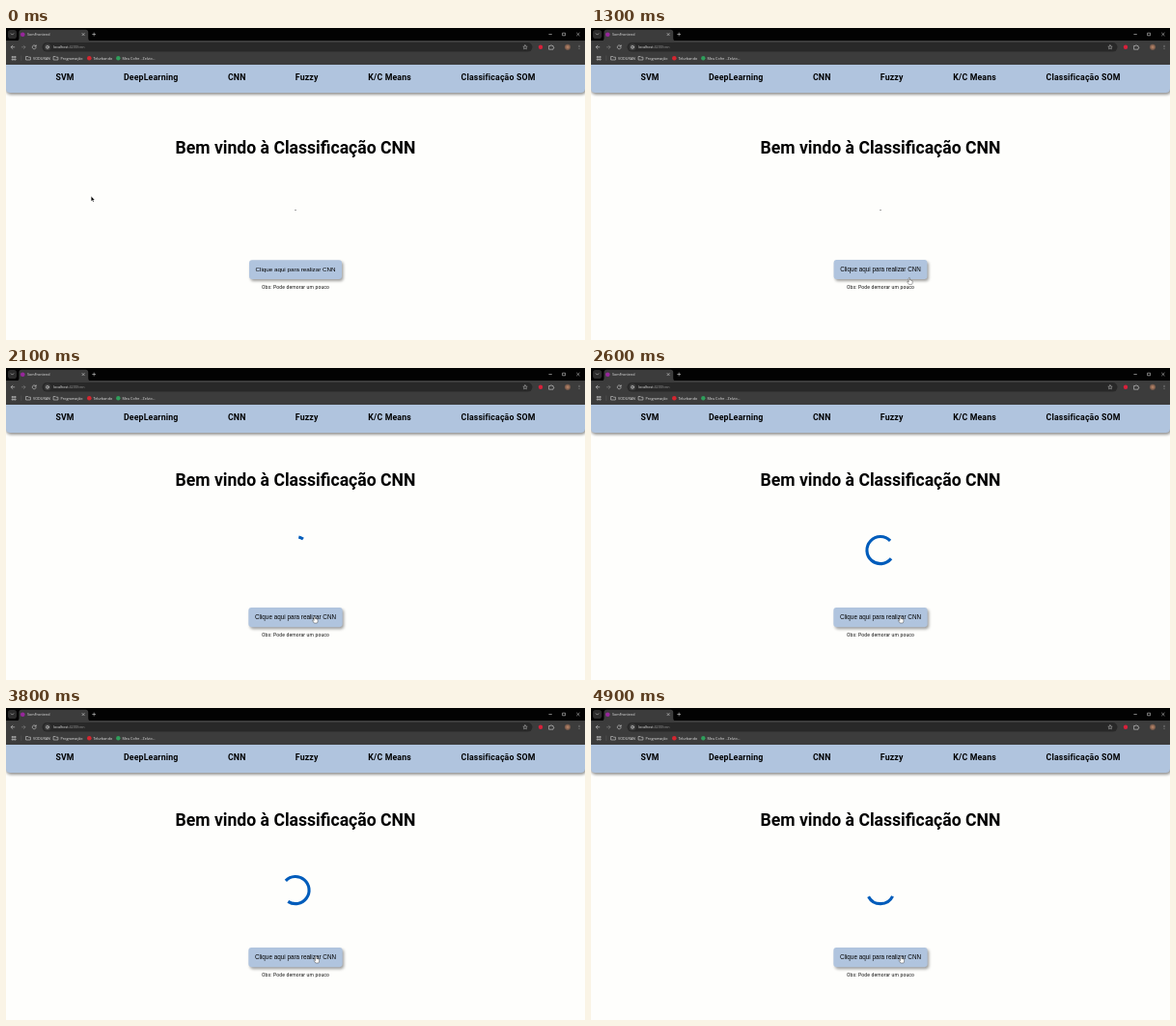
Animation of 600x323 px, one loop 5000 ms. Source, as an HTML page:

```html
<!DOCTYPE html>
<html lang="pt-BR">
<head>
<meta charset="utf-8">
<title>SomFrontend</title>
<style>
  html, body { margin: 0; width: 100%; height: 100%; overflow: hidden; background: #fefefc; }
  svg { display: block; width: 100%; height: 100%; }
  text { font-family: Roboto, sans-serif; white-space: pre; }
  .ui text { font: 3.7px "Open Sans", "Noto Sans", sans-serif; fill: #e6e6e6; }
  .nav text { font-weight: 700; font-size: 8.75px; letter-spacing: .156px; text-anchor: middle; }
  .mid { text-anchor: middle; }
  .icon { fill: none; stroke: #d0d0d0; stroke-width: .6; stroke-linecap: round; stroke-linejoin: round; }
</style>
</head>
<body>
<svg viewBox="0 0 600 323">
  <defs>
    <filter id="soft" x="-20%" y="-50%" width="140%" height="220%"><feGaussianBlur stdDeviation="1.5"/></filter>
    <radialGradient id="face"><stop offset="0" stop-color="#c08a6a"/><stop offset="1" stop-color="#6a5146"/></radialGradient>
  </defs>
  <rect width="600" height="323" fill="#fefefc"/>

  <!-- page header -->
  <rect x="0" y="33" width="601.5" height="36" rx="5" fill="#000" opacity=".42" filter="url(#soft)"/>
  <path d="M0 37H600V62.500Q600 67 595.500 67H4.500Q0 67 0 62.500Z" fill="#b0c4de"/>
  <g class="nav" id="nav"></g>

  <!-- browser frame -->
  <g class="ui">
    <rect width="600" height="14" fill="#020202"/>
    <rect x="2" y="2" width="9" height="9" rx="2.800" fill="#2c2c2c"/>
    <path class="icon" d="M5.200 5.800L6.500 7.100L7.800 5.800"/>
    <path d="M10.500 13.500Q13.500 13.500 13.500 10.500V4.500Q13.500 1.800 16.200 1.800H82.500Q85.200 1.800 85.200 4.500V10.500Q85.200 13.500 88.200 13.500Z" fill="#3c3c3c"/>
    <rect y="13" width="600" height="25" fill="#3c3c3c"/>
    <circle cx="17.300" cy="6.700" r="2.300" fill="#97269b"/>
    <text x="22" y="8">SomFrontend</text>
    <path class="icon" d="M79 5.500L81.200 7.700M81.200 5.500L79 7.700M89.700 6.500H92.700M91.200 5V8M562.800 6.500H565.400M577 5.200H579.600V7.800H577ZM591.600 5.200L594.200 7.800M594.200 5.200L591.600 7.800"/>

    <path class="icon" d="M8.800 19.800H5.300M6.900 18.100L5.200 19.800L6.900 21.500M31 18.800A2 2 0 1 0 31.200 20.400M31.200 17.800V19.100H29.900"/>
    <path class="icon" d="M16.400 19.800H19.900M18.300 18.100L20 19.800L18.300 21.500" opacity=".45"/>
    <rect x="37.500" y="15" width="508" height="9.600" rx="4.800" fill="#282828"/>
    <circle cx="43" cy="19.800" r="3.500" fill="#3c3c3c"/>
    <circle class="icon" cx="43" cy="19.800" r="1.500"/>
    <path class="icon" d="M43 19.600V20.600"/>
    <text x="49" y="21.200">localhost<tspan fill="#9a9a9a">:4200/cnn</tspan></text>
    <path class="icon" d="M538 17.700L538.650 19.100L540.200 19.250L539.050 20.300L539.400 21.800L538 21L536.600 21.800L536.950 20.300L535.800 19.250L537.350 19.100Z" style="stroke-width:.45"/>
    <circle cx="554" cy="19.800" r="2.200" fill="#d8213b"/>
    <path class="icon" d="M563 18.500H564.200A.8.8 0 0 1 565.800 18.500H567V19.600A.8.8 0 0 1 567 21.200V22.200H563Z"/>
    <circle cx="582" cy="19.800" r="3.100" fill="url(#face)"/>
    <g fill="#d0d0d0"><circle cx="594" cy="18.200" r=".45"/><circle cx="594" cy="19.800" r=".45"/><circle cx="594" cy="21.400" r=".45"/></g>

    <path class="icon" d="M6.500 29.500H7.600V30.600H6.500ZM9 29.500H10.100V30.600H9ZM6.500 32H7.600V33.100H6.500ZM9 32H10.100V33.100H9Z"/>
    <path d="M15.800 28.500V34" stroke="#666" stroke-width=".4"/>
    <path class="icon" id="folder" d="M21 29.500H22.700L23.300 30.200H25.400V33H21Z"/>
    <use href="#folder" x="28.500"/>
    <circle cx="86.300" cy="31.300" r="2.300" fill="#d42630"/>
    <circle cx="116.300" cy="31.300" r="2.200" fill="#2f9e5b"/>
    <g id="marks"></g>
  </g>

  <!-- page body -->
  <text class="mid" id="title" x="300" y="129.500" font-size="17.600" font-weight="700">Bem vindo à Classificação CNN</text>
  <rect id="dash" x="299.200" y="188.200" width="1.600" height=".6" fill="#444"/>
  <path id="arc" fill="none" stroke="#005cbb" stroke-width="3.125"/>
  <g id="button">
    <rect x="253.500" y="242" width="96" height="20" rx="3" opacity=".38" filter="url(#soft)"/>
    <rect x="252" y="240.200" width="96" height="19.800" rx="3" fill="#b0c4de"/>
    <text class="mid" x="300" y="252.300" style="font:6.250px 'Liberation Sans',Arial,sans-serif">Clique aqui para realizar CNN</text>
  </g>
  <text class="mid" id="note" x="300" y="270.200" font-size="5" letter-spacing=".156" fill="#111">Obs: Pode demorar um pouco</text>

  <path id="arrow" d="M0 0V5L1.150 4L1.950 5.800L2.750 5.450L1.950 3.700H3.500Z" fill="#000" stroke="#fff" stroke-width=".25"/>
  <path id="hand" d="M-.65.500Q-.65-.2 0-.2Q.65-.2.65.500V2.200Q1.300 1.900 1.600 2.500Q2.200 2.200 2.500 2.800Q3.300 2.600 3.300 3.500V4.700Q3.300 5.800 2.600 6.700H-.5L-2.100 4.300Q-2.300 3.500-1.600 3.500L-.65 4.300Z" fill="#fff" stroke="#222" stroke-width=".4" stroke-linejoin="round"/>
</svg>
<script>
const LOOP = 5000, STEP = 100, CLICK = 2019;
const $ = id => document.getElementById(id);
const clamp = v => Math.min(1, Math.max(0, v));

const label = (parent, x, y, str) => {
  const el = document.createElementNS("http://www.w3.org/2000/svg", "text");
  el.setAttribute("x", x);
  el.setAttribute("y", y);
  el.textContent = str;
  parent.append(el);
};
[[61, "SVM"], [150.2, "DeepLearning"], [239.2, "CNN"], [311.700, "Fuzzy"], [397.600, "K/C Means"], [510, "Classificação SOM"]]
  .forEach(([x, str]) => label($("nav"), x, 54.400, str));
[[28, "VODURAN"], [56.500, "Programação"], [90.500, "Telurbando"], [120.500, "Meu Cofre - Zelvio..."]]
  .forEach(([x, str]) => label($("marks"), x, 32.600, str));

// time, x, y of the pointer tip
const path = [
  [0, 88.300, 174.200], [100, 112, 178], [600, 468, 262], [800, 507, 280.500],
  [900, 490, 278], [1200, 332, 259], [1800, 319.300, 257.400], [2600, 320.600, 257.300], [3400, 321.300, 257.300], [5000, 321.300, 257.300]
];
function pointer(t) {
  const i = path.findIndex(p => p[0] > t);
  const [t0, x0, y0] = path[i - 1], [t1, x1, y1] = path[i];
  const k = (t - t0) / (t1 - t0);
  return [x0 + (x1 - x0) * k, y0 + (y1 - y0) * k];
}

// cubic-bezier(.4, 0, .2, 1)
function ease(x) {
  let lo = 0, hi = 1, s = .5;
  for (let i = 0; i < 24; i++) {
    s = (lo + hi) / 2;
    const r = 1 - s;
    if (1.2 * s * r * r + .6 * s * s * r + s ** 3 < x) lo = s; else hi = s;
  }
  return s * s * (3 - 2 * s);
}

// an arc that opens and closes about its middle while it turns
function arcPath(t) {
  const half = 666.500, n = Math.floor(t / half), e = ease(t / half - n);
  const spread = 5 + 135 * (n % 2 ? 1 - e : e);
  const mid = -90 + 360 * t / 1568 + 135 * (n + e);
  const r = 14.060;
  const at = deg => {
    const a = deg * Math.PI / 180;
    return `${300 + r * Math.cos(a)} ${188.600 + r * Math.sin(a)}`;
  };
  return `M${at(mid - spread)}A${r} ${r} 0 ${spread > 90 ? 1 : 0} 1 ${at(mid + spread)}`;
}

const show = (id, on) => $(id).setAttribute("visibility", on ? "visible" : "hidden");
const move = (id, value) => $(id).setAttribute("transform", value);

function draw(now) {
  const t = Math.floor(now % LOOP / STEP) * STEP;
  const busy = t >= CLICK, shift = busy ? 8 : 0;
  const [x, y] = pointer(t);
  const over = t >= 1100 && x < 348 && y < 260 + shift;
  const grow = 1 + .014 * clamp((t - 1100) / 300);

  move("title", `translate(0 ${-shift})`);
  move("note", `translate(0 ${shift})`);
  move("button", `translate(300 ${250.100 + shift}) scale(${grow}) translate(-300 -250.1)`);
  show("dash", !busy);
  show("arc", busy);
  if (busy) $("arc").setAttribute("d", arcPath(t - CLICK));
  show("arrow", !over);
  show("hand", over);
  move(over ? "hand" : "arrow", `translate(${x} ${y})`);
}

const start = performance.now();
function tick() {
  draw(performance.now() - start);
  requestAnimationFrame(tick);
}
tick();
</script>
</body>
</html>
```
